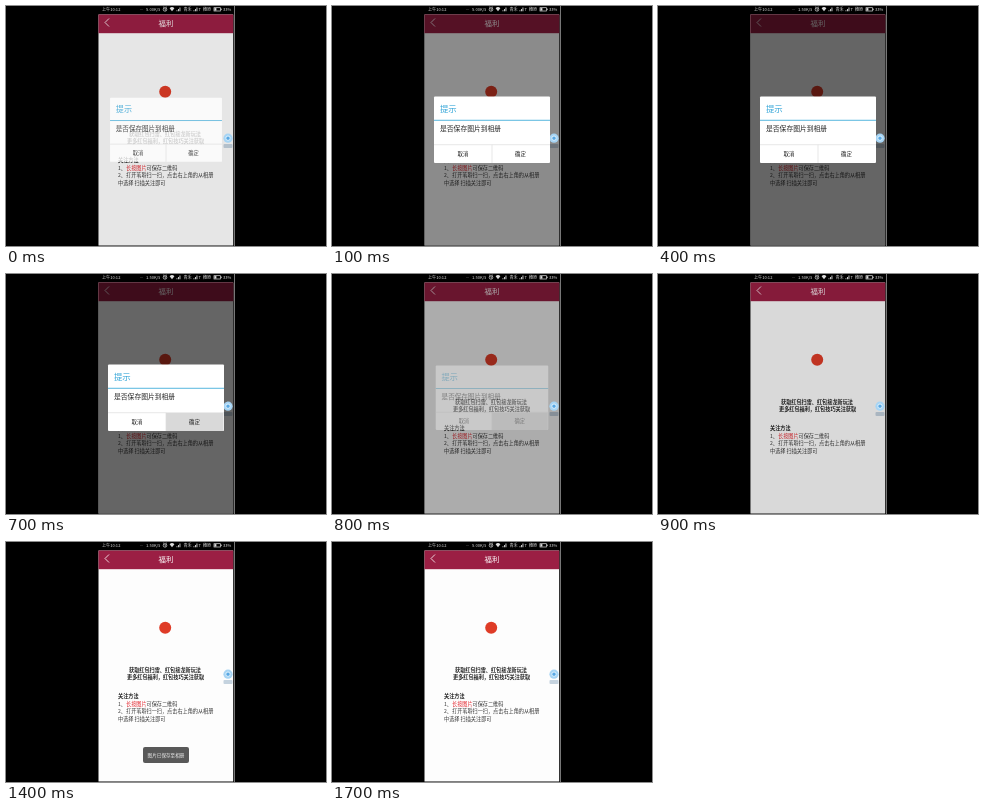
Animation of 320 by 240 pixels, one loop 1800 ms. Source, as an HTML page:

```html
<!DOCTYPE html>
<html lang="zh-CN">
<head>
<meta charset="utf-8">
<title>福利</title>
<style>
  html, body { margin: 0; width: 100%; height: 100%; overflow: hidden; background: #000; }
  svg { display: block; width: 100%; height: 100%; }
  text { font-family: "Noto Sans CJK SC", "Noto Sans CJK", "Noto Sans", sans-serif; white-space: pre; }
  .mid { text-anchor: middle; }
  .status { font-size: 4.1px; fill: #ddd; }
  .body { font-size: 5.15px; fill: #333; }
  .bold { font-weight: 700; fill: #222; }
  .button { font-size: 5.4px; fill: #222; text-anchor: middle; }
  .line { fill: none; stroke: #ddd; stroke-width: .7; }
</style>
</head>
<body>
<svg viewBox="0 0 320 240">
  <rect width="320" height="240"/>

  <!-- page -->
  <rect x="92.5" y="8.5" width="134.7" height="231" fill="#fdfdfd"/>
  <rect x="92.5" y="8.5" width="134.7" height="18.7" fill="#9b1f44"/>
  <path d="M103 12.5l-4 4 4 4" class="line" style="stroke:#fff;stroke-width:.8"/>
  <text x="160" y="19.6" class="mid" font-size="7.4" font-weight="500" fill="#fff">福利</text>
  <circle cx="159.2" cy="85.7" r="6" fill="#df3c27"/>
  <text x="123" y="130" class="body bold">获取红包扫雷、红包接龙新玩法</text>
  <text x="121" y="137.4" class="body bold">更多红包福利，红包技巧关注获取</text>
  <text x="112" y="156.2" class="body bold">关注方法</text>
  <text x="112" y="163.7" class="body">1、<tspan fill="#e3262e">长按图片</tspan>可保存二维码</text>
  <text x="112" y="171.4" class="body">2、打开苇聆扫一扫，点击右上角的从相册</text>
  <text x="112" y="179" class="body">中选择 扫描关注即可</text>
  <rect x="217.5" y="138" width="9" height="4" rx="1" fill="#c5d3df"/>
  <rect id="dim" x="92.5" y="8.5" width="134.7" height="231"/>
  <rect x="228" width="1" height="240" fill="#777"/>

  <!-- status bar -->
  <g class="status">
    <text x="96" y="4.8">上午10:12</text>
    <text x="134" y="4">...</text>
    <text id="speed" x="140" y="4.8"></text>
    <path d="M159 2v1.6l1.1.7M157.2 1.4l1-.9M160.8 1.4l-1-.9M157.2 3.4a1.8 1.8 0 1 0 3.6 0a1.8 1.8 0 1 0-3.6 0" class="line"/>
    <path d="M163.6 2.2q2.4-2.2 4.8 0l-2.4 3z"/>
    <path d="M170.5 5.2v-1h.9v1zM172 5.2v-2.2h.9v2.2zM173.5 5.2v-3.8h.9v3.8z"/>
    <text x="177.5" y="4.8">青禾</text>
    <path d="M187.5 5.2v-1h.9v1zM189 5.2v-2.2h.9v2.2zM190.5 5.2v-3.8h.9v3.8z"/>
    <text x="192.5" y="4.8">T</text>
    <text x="197" y="4.8">穗原</text>
    <rect x="208" y="1.7" width="6.4" height="3.3" class="line"/>
    <rect x="208.4" y="2.1" width="2" height="2.5"/>
    <rect x="214.8" y="2.6" width=".8" height="1.5"/>
    <text x="217" y="4.8">33%</text>
  </g>

  <!-- floating button -->
  <circle cx="222" cy="132.2" r="4.6" fill="#a6d4f4"/>
  <circle cx="222" cy="132.2" r="2.2" fill="#58a8e4" stroke="#e8f5fd" stroke-width=".9"/>

  <g id="dialog">
    <rect x="102" y="90.5" width="116" height="66.5" rx="1" fill="#fff"/>
    <text x="108" y="105.8" font-size="8.4" fill="#35a6d8">提示</text>
    <rect x="102" y="113.8" width="116" height=".9" fill="#44aedb"/>
    <text x="108" y="125" font-size="6.8" fill="#222">是否保存图片到相册</text>
    <rect id="pressed" x="160" y="139" width="57.5" height="18" fill="#d9d9d9"/>
    <path d="M102 138.7h116M160 138.7v18.3" class="line"/>
    <text x="131" y="150" class="button">取消</text>
    <text x="188.5" y="150" class="button">确定</text>
  </g>

  <g id="toast">
    <rect x="137" y="205" width="46" height="16" rx="2" fill="#484848"/>
    <text x="160" y="214.8" class="mid" font-size="4.6" fill="#eee">图片已保存至相册</text>
  </g>
</svg>
<script>
const LOOP = 1800, STEP = 100;
const $ = id => document.getElementById(id);
const [dim, speed, dialog, pressed, toast] =
  ['dim', 'speed', 'dialog', 'pressed', 'toast'].map($);

// Value of the last [time, value] pair already reached
const hold = (t, keys) => keys.filter(([at]) => at <= t).pop()[1];

const dimming = [[0, .09], [100, .45], [200, .6], [800, .32], [900, .14], [1000, .04], [1100, 0]];
const dialogAlpha = [[0, .8], [100, 1], [800, .35], [900, 0]];
const dialogScale = [[0, .965], [100, 1], [800, .97]];
const toastAlpha = [[0, 0], [1200, .5], [1300, .9], [1600, .45], [1700, 0]];
const speeds = [[0, '5.00K/s'], [300, '1.50K/s'], [1500, '5.00K/s']];

function draw(now) {
  const t = Math.floor(now % LOOP / STEP) * STEP;
  dim.style.opacity = hold(t, dimming);
  dialog.style.opacity = hold(t, dialogAlpha);
  dialog.setAttribute('transform',
    `translate(160 124) scale(${hold(t, dialogScale)}) translate(-160 -124)`);
  pressed.style.opacity = t >= 600 ? 1 : 0;
  toast.style.opacity = hold(t, toastAlpha);
  speed.textContent = hold(t, speeds);
}

const start = performance.now();
function tick() {
  draw(performance.now() - start);
  requestAnimationFrame(tick);
}
tick();
</script>
</body>
</html>
```
